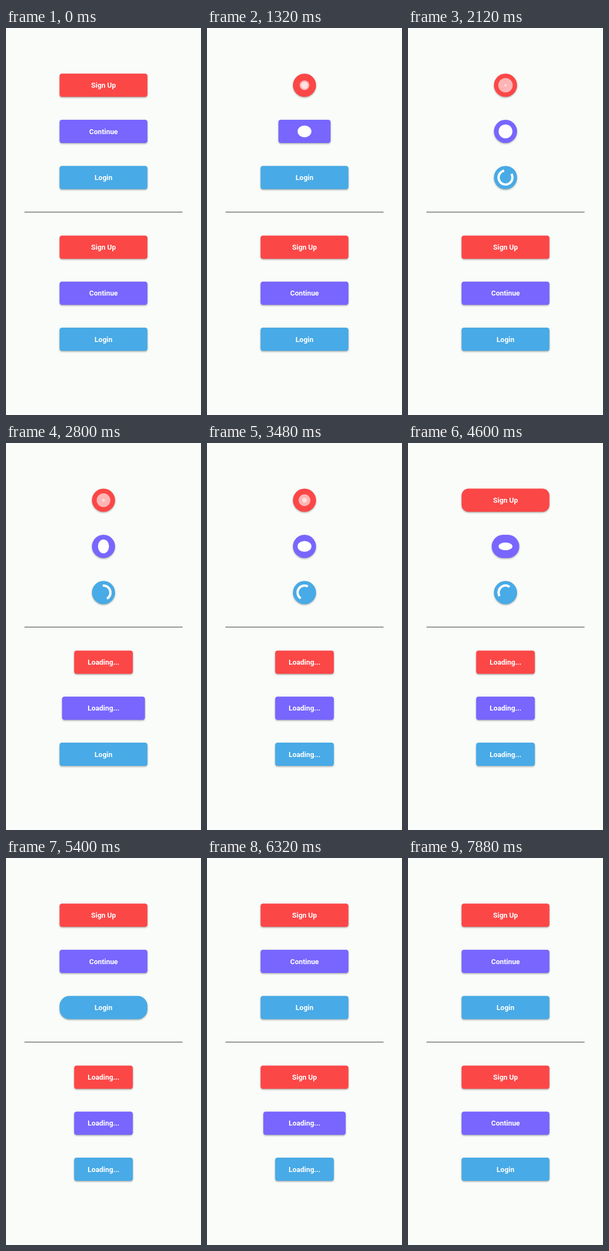
An HTML page with a canvas for the animation above (8 s loop, 354 by 700 pixels).

```html
<!DOCTYPE html>
<html lang="en">
<head>
<meta charset="utf-8">
<title>Loading buttons</title>
<style>
  html, body { margin: 0; width: 100%; height: 100%; overflow: hidden; background: #f9fcf9; }
  canvas { display: block; width: 354px; height: 700px; }
</style>
</head>
<body>
<canvas id="stage"></canvas>
<script>
const W = 354, H = 700, LOOP = 8000, STEP = 40;
const CX = 177, WIDE = 159.5, TALL = 42, CORNER = 4.2;
const RESIZE = 400, ROUND = 178, SPIN = 1070, BOUNCE = 1785;

const canvas = document.getElementById('stage');
const ctx = canvas.getContext('2d');
const dpr = window.devicePixelRatio || 1;
canvas.width = W * dpr;
canvas.height = H * dpr;

const clamp = v => Math.min(1, Math.max(0, v));
const mix = (a, b, p) => a + (b - a) * p;

// CSS-style cubic-bezier easing, solved by bisection
function bezier(x1, y1, x2, y2) {
  const at = (a, b, s) => 3 * (1 - s) * (1 - s) * s * a + 3 * (1 - s) * s * s * b + s * s * s;
  return x => {
    if (x <= 0) return 0;
    if (x >= 1) return 1;
    let lo = 0, hi = 1;
    for (let i = 0; i < 24; i++) {
      const mid = (lo + hi) / 2;
      if (at(x1, x2, mid) < x) lo = mid; else hi = mid;
    }
    return at(y1, y2, lo);
  };
}
const inOutCirc = bezier(0.785, 0.135, 0.15, 0.86);
const inOut = bezier(0.42, 0, 0.58, 1);
const easeIn = bezier(0.42, 0, 1, 1);
const easeOut = bezier(0, 0, 0.58, 1);
const fastOutSlowIn = bezier(0.4, 0, 0.2, 1);

function disc(y, rx, ry, alpha) {
  ctx.fillStyle = `rgba(255,255,255,${alpha})`;
  ctx.beginPath();
  ctx.ellipse(CX, y, rx, ry, 0, 0, 2 * Math.PI);
  ctx.fill();
}

function label(text, y) {
  ctx.fillStyle = '#fff';
  ctx.font = '700 12.9px Roboto, sans-serif';
  ctx.textAlign = 'center';
  ctx.textBaseline = 'alphabetic';
  ctx.fillText(text, CX, y + 4.5);
}

// Two translucent discs growing and shrinking in opposition
function bounce(y, ms) {
  const u = (ms / BOUNCE) % 2;
  const a = Math.abs(2 * inOut(u > 1 ? 2 - u : u) - 1);
  disc(y, 15 * (1 - a), 15 * (1 - a), 0.6);
  disc(y, 15 * a, 15 * a, 0.6);
}

// A disc flipping about the horizontal axis, then the vertical one
function flip(y, ms) {
  const u = (ms / SPIN) % 1;
  const r = 12.6;
  const tilt = Math.abs(Math.cos(Math.PI * easeIn(u * 2)));
  const turn = Math.abs(Math.cos(Math.PI * easeOut(u * 2 - 1)));
  disc(y, r * turn, r * tilt, 1);
}

// A rotating arc that lengthens and shortens
function ring(y, ms) {
  const u = (ms / SPIN) % 1;
  const peak = u <= 0.5 ? 2 * u : 2 * (1 - u);
  const from = Math.PI * (mix(-2 / 3, 1 / 2, clamp(u * 2 - 1)) + u * 5 / 6);
  ctx.strokeStyle = '#fff';
  ctx.lineWidth = 4.2;
  ctx.beginPath();
  ctx.arc(CX, y, 12.6, from, from + 2 * Math.PI * mix(1 / 4, 5 / 6, peak));
  ctx.stroke();
}

const loading = y => label('Loading...', y);

const RED = '#fc4747', PURPLE = '#7866fe', BLUE = '#48aae6';
const buttons = [
  { y: 103.5, color: RED, text: 'Sign Up', start: 650, stop: 4138, loader: bounce, round: true },
  { y: 187, color: PURPLE, text: 'Continue', start: 1125, stop: 4505, loader: flip, round: true },
  { y: 270.5, color: BLUE, text: 'Login', start: 1560, stop: 4960, loader: ring, round: true },
  { y: 396.5, color: RED, text: 'Sign Up', start: 2300, stop: 5700, loader: loading },
  { y: 479.7, color: PURPLE, text: 'Continue', start: 2660, stop: 6066, loader: loading },
  { y: 563, color: BLUE, text: 'Login', start: 3070, stop: 6470, loader: loading }
];

function drawButton(b, t) {
  const forward = clamp((t - b.start) / RESIZE);
  const back = clamp((t - b.stop) / RESIZE);
  const shrink = inOutCirc(t < b.stop ? forward : 1 - back);
  const width = mix(WIDE, b.round ? TALL : 106.5, shrink);

  // Corners only change once the width has settled
  const after = from => fastOutSlowIn(clamp((t - from - RESIZE) / ROUND));
  const curl = b.round ? after(b.start) - after(b.stop) : 0;

  ctx.save();
  ctx.shadowColor = 'rgba(0,0,0,0.32)';
  ctx.shadowBlur = 3 * dpr;
  ctx.shadowOffsetY = 1.5 * dpr;
  ctx.fillStyle = b.color;
  ctx.beginPath();
  ctx.roundRect(CX - width / 2, b.y - TALL / 2, width, TALL, mix(CORNER, TALL / 2, curl));
  ctx.fill();
  ctx.restore();

  const busy = t >= b.start && t < b.stop + RESIZE;
  if (busy) b.loader(b.y, t - b.start);
  else label(b.text, b.y);
}

function draw(t) {
  ctx.setTransform(dpr, 0, 0, dpr, 0, 0);
  ctx.fillStyle = '#f9fcf9';
  ctx.fillRect(0, 0, W, H);
  ctx.fillStyle = '#7b7d7b';
  ctx.fillRect(33.5, 332.2, 287, 1.6);
  for (const b of buttons) drawButton(b, t);
}

const begin = performance.now();
function tick() {
  const t = (performance.now() - begin) % LOOP;
  draw(Math.floor(t / STEP) * STEP);
  requestAnimationFrame(tick);
}
tick();
</script>
</body>
</html>
```
